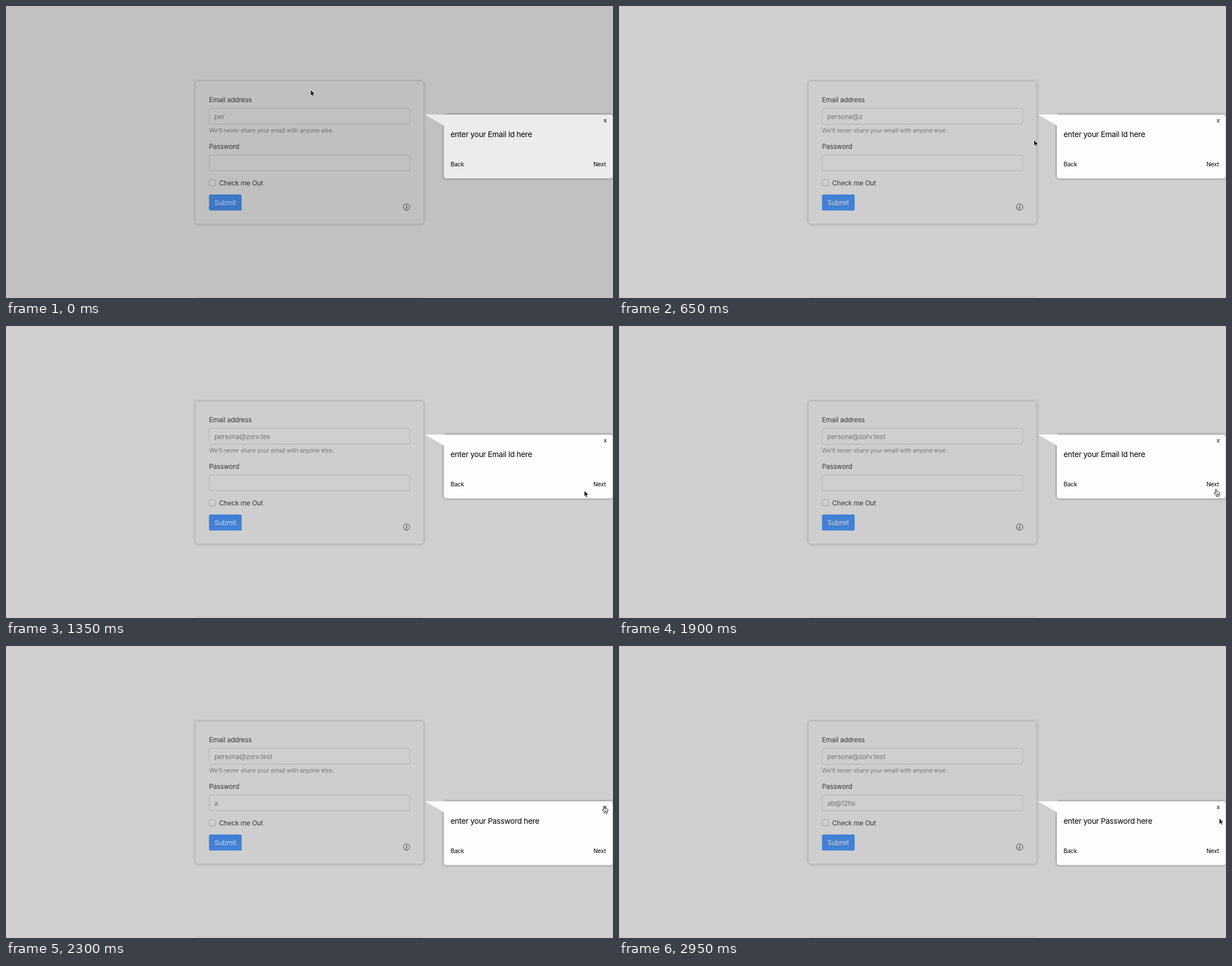
An HTML page that plays this animation: 1078x519 px, repeating every 3000 ms.

```html
<!DOCTYPE html>
<html lang="en">
<head>
<meta charset="utf-8">
<title>Form tour</title>
<style>
  html, body { margin: 0; height: 100%; overflow: hidden; background: #cfcfcf; }
  svg { display: block; width: 100vw; height: 100vh; }
  text { font: 12px Inter, Roboto, sans-serif; letter-spacing: -.02em; fill: #38393b; }
  .card { fill: #cecece; filter: drop-shadow(0 0 2.5px rgba(0, 0, 0, .3)); }
  .field { fill: #cfcfcf; stroke: #aeb1b4; }
  .typed { fill: #717579; }
  .help { font-size: 10.5px; letter-spacing: -.015em; fill: #76797d; }
  #tip text { fill: #000; font-size: 10.5px; }
  #tip #message { font-size: 13.5px; }
  .bubble { fill: #fdfdfd; filter: drop-shadow(0 0 2px rgba(0, 0, 0, .5)); }
</style>
</head>
<body>
<svg viewBox="0 0 1078 519">
  <rect class="card" x="336.5" y="134" width="405" height="253.5" rx="5"/>
  <rect class="card" x="336.5" y="521" width="405" height="50" rx="5"/>

  <text x="360.5" y="171">Email address</text>
  <rect class="field" x="361" y="182" width="356" height="28" rx="2.5"/>
  <text class="typed" id="email" x="370" y="200.5"></text>
  <text class="help" x="360.5" y="225">We'll never share your email with anyone else.</text>

  <text x="360.5" y="254">Password</text>
  <rect class="field" x="361" y="265" width="356" height="28" rx="2.5"/>
  <text class="typed" id="password" x="370" y="283.5"></text>

  <rect class="field" x="361" y="308.5" width="11" height="11" rx="2.5" style="stroke:#999b9e"/>
  <text x="378.5" y="318.5">Check me Out</text>
  <rect x="360.5" y="335" width="58" height="28.5" rx="2.5" fill="#4180d4"/>
  <text x="370.3" y="353.5" style="fill:#d2d4d8">Submit</text>

  <circle cx="711.4" cy="357.4" r="5.6" fill="none" stroke="#3c3c3c"/>
  <text x="711.3" y="360.7" text-anchor="middle" style="font:italic bold 10px 'Liberation Serif',serif">i</text>

  <g id="tip">
    <rect class="bubble" x="777.5" y="193" width="300" height="113.5" rx="4.5"/>
    <path d="M744 193H783V216L777.5 212.5Z" fill="#fdfdfd"/>
    <text x="1064" y="206.5" text-anchor="middle">x</text>
    <text id="message" x="789.5" y="232.5"></text>
    <text x="789.5" y="285">Back</text>
    <text x="1065.5" y="285" text-anchor="end">Next</text>
  </g>

  <g id="cursor">
    <path id="arrow" d="M0 0V10.8L2.5 8.5L4.1 12.2L6 11.4L4.4 7.8H7.7Z"
      fill="#000" stroke="#fff" stroke-width=".9" stroke-linejoin="round"/>
    <path id="hand" d="M-.9 1.2C-.9 -.3 1.1 -.3 1.2 1.2L1.6 4.6C2.2 3.8 3.3 4 3.5 4.9C4.2 4.3 5.2 4.6 5.4 5.5C6.3 5.1 7.1 5.7 7.1 6.7C7.1 9 6.6 10 5.9 11.1V12.6H.5V11.5C-.8 10.3 -1.8 8.8 -2.8 7.3C-3.3 6.2 -2 5.5 -1.2 6.3L-.1 7.5ZM1.6 8V10.6M3.2 8V10.6M4.8 8V10.6"
      fill="#fff" stroke="#000" stroke-width=".85" stroke-linejoin="round"/>
  </g>
  <rect id="shade" width="1078" height="519"/>
</svg>
<script>
const $ = id => document.getElementById(id);
const LOOP = 3000, STEP = 50, SWITCH = 2300;
const EMAIL = 'persona@zorv.test', PASSWORD = 'ab@12hs';

// Pointer path: time, x, y
const path = [
  [0, 541, 149], [300, 604, 180], [650, 737, 238], [1000, 1035, 293],
  [1100, 1050, 296], [1350, 1027, 292.5], [1650, 1056, 291], [1900, 1060, 290],
  [2250, 1062, 284.5], [2400, 1062, 284.5], [2700, 1066, 300], [2950, 1066, 306], [LOOP, 1066, 306]
];

function pointerAt(t) {
  const i = path.findIndex(p => p[0] > t);
  const [t0, x0, y0] = path[i - 1], [t1, x1, y1] = path[i];
  const k = (t - t0) / (t1 - t0);
  return [x0 + (x1 - x0) * k, y0 + (y1 - y0) * k];
}

function draw(now) {
  const t = Math.floor(now % LOOP / STEP) * STEP;
  const second = t >= SWITCH;
  const overHand = t >= 1700 && t < 2550;

  $('email').textContent = EMAIL.slice(0, 3 + Math.floor(t / 100));
  $('password').textContent = second ? PASSWORD.slice(0, 1 + Math.floor((t - SWITCH) / 100)) : '';
  $('message').textContent = `enter your ${second ? 'Password' : 'Email Id'} here`;
  $('tip').setAttribute('transform', `translate(0 ${second ? 83 : 0})`);

  $('cursor').setAttribute('transform', `translate(${pointerAt(t)})`);
  $('arrow').style.display = overHand ? 'none' : '';
  $('hand').style.display = overHand ? '' : 'none';
  $('shade').style.opacity = .065 * Math.max(0, 1 - t / 450);
}

let start;
function frame(now) {
  start ??= now;
  draw(now - start);
  requestAnimationFrame(frame);
}
draw(0);
requestAnimationFrame(frame);
</script>
</body>
</html>
```
